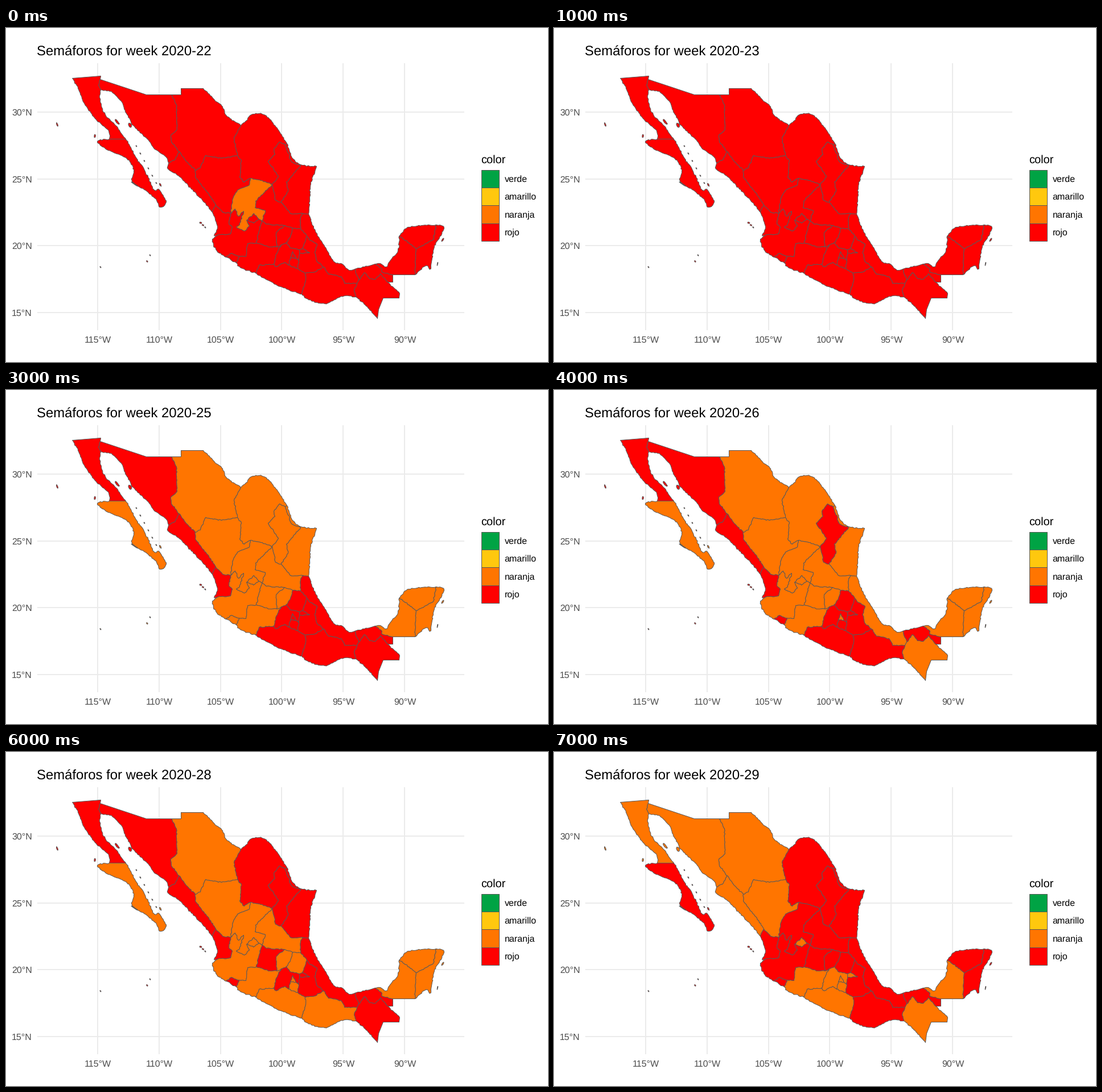
A matplotlib script for the animation above (8000 ms loop, 952x588 px).

```python
import numpy as np
import matplotlib.pyplot as plt
from matplotlib.animation import FuncAnimation
from matplotlib.patches import Polygon, Rectangle

W, H, DPI = 952, 588, 100
PX = 72 / DPI
GREEN, YELLOW, ORANGE, RED = "#00A344", "#FFC80E", "#FF7500", "#FF0000"
EDGE, GRID, AXIS = "#595959", "#EBEBEB", "#4D4D4D"

plt.rcParams["font.family"] = "Liberation Sans"
plt.rcParams["text.hinting"] = "none"
rng = np.random.default_rng(7)
arcs = []      # (states on both sides, points); "~" is sea or abroad
isles = []     # (state, points)


def trace(sides, xy, rough=0, curved=False):
    """Run a line through key points, wrinkling the stretches between them."""
    p = np.array(xy, float).reshape(-1, 2) + .5
    slope = np.gradient(p, axis=0)
    path = [p[:1]]
    for a, b, va, vb in zip(p, p[1:], slope, slope[1:]):
        n = max(1, round(np.hypot(*(b - a)) / 2.8)) if rough else 1
        t = np.linspace(0, 1, n + 1)[1:, None]
        seg = a + (b - a) * t
        if curved:
            ease = t * t * (3 - 2 * t)
            seg = a + (b - a) * ease + t * (1 - t) * (va * (1 - t) - vb * t)
        seg[:-1] += rng.uniform(-rough, rough, (n - 1, 2))
        path.append(seg)
    arcs.append((sides.split(), np.vstack(path)))


def border(sides, *xy):
    trace(sides, xy, rough=.9)


def coast(state, *xy):
    trace(state + " ~", xy, rough=.9, curved=True)


def straight(state, *xy):
    trace(state + " ~", xy)


def isle(state, x, y, rx=.7, ry=1.2, lean=.5):
    t = np.arange(0, 2 * np.pi, .7)
    r = rng.uniform(.8, 1.2, t.size)
    px = x + r * (rx * np.cos(t) + lean * ry * np.sin(t))
    isles.append((state, np.column_stack([px, y + r * ry * np.sin(t)])))


def outline(state):
    """Chain all lines that touch a state into one closed ring."""
    rest = [p for sides, p in arcs if state in sides]
    path = [rest.pop(0)]
    while rest:
        end = path[-1][-1]
        _, i, flip = min((np.hypot(*(p[-f] - end)), i, f)
                         for i, p in enumerate(rest) for f in (0, 1))
        p = rest.pop(i)
        path.append(p[::-1] if flip else p)
    return np.vstack(path)


# Peninsula
coast("BC", 181, 195, 180, 181, 156, 159, 141, 138, 133, 124, 126, 106, 116, 88)
straight("BC", 116, 88, 166, 84, 165, 90)
border("BC SO", 165, 90, 162, 100, 166, 108)
coast("BC", 166, 108, 165, 128, 174, 152, 192, 171, 210, 195)
trace("BC BS", (181, 195, 210, 195))
coast("BS", 181, 195, 160, 199, 177, 214, 200, 223, 217, 235, 224, 252, 221, 270,
      247, 287, 264, 303, 270, 315, 281, 306, 267, 283, 260, 285, 244, 252, 229, 229,
      219, 210, 210, 195)

# North-west
straight("SO", 165, 90, 246, 117, 290, 117)
coast("SO", 166, 108, 182, 111, 192, 118, 205, 134, 211, 150, 227, 176, 249, 196,
      259, 211, 280, 226, 285, 237)
border("SO SI", 285, 237, 297, 230, 303, 217)
border("SO CH", 290, 117, 299, 135, 300, 178, 289, 188, 290, 200, 303, 217)
straight("CH", 290, 117, 307, 117, 307, 106, 346, 106)
coast("CH", 346, 106, 364, 124, 380, 138, 387, 154, 412, 171)
border("CH SI", 303, 217, 318, 236, 332, 250)
border("CH DG", 332, 250, 341, 246, 350, 224, 378, 229, 406, 224)
border("CH CO", 412, 171, 400, 194, 406, 224)
coast("SI", 285, 237, 284, 248, 303, 260, 325, 283, 347, 306, 362, 324)
border("SI DG", 332, 250, 332, 262, 352, 288, 368, 311)
border("SI NY", 362, 324, 368, 311)

# North-east
coast("CO", 412, 171, 421, 163, 434, 151, 455, 153, 474, 174, 493, 203)
border("CO TM", 493, 203, 490, 205)
border("CO NL", 490, 205, 480, 200, 470, 213, 472, 222, 460, 234, 478, 261, 467, 275)
border("CO DG", 406, 224, 413, 234, 410, 262, 418, 271, 429, 264)
border("CO ZC", 429, 264, 447, 268, 467, 275)
border("NL TM", 490, 205, 501, 235, 517, 242, 492, 271, 495, 287, 483, 306)
border("NL SL", 467, 275, 473, 303, 483, 306)
coast("TM", 493, 203, 504, 230, 522, 241, 545, 243)
coast("TM", 545, 243, 535, 274, 533, 300, 531, 327)
border("TM SL", 483, 306, 499, 326, 521, 326)
border("TM VE", 521, 326, 531, 327)

# Centre-north
border("DG NY", 368, 311, 380, 324, 394, 326)
border("DG ZC", 429, 264, 427, 276, 406, 285, 398, 300, 394, 326)
border("ZC SL", 467, 275, 438, 304, 437, 316, 455, 321, 449, 339)
border("ZC JA", 394, 326, 402, 318, 408, 331, 417, 322, 410, 346, 404, 350, 418, 357,
       427, 348, 422, 338)
border("ZC AG", 422, 338, 435, 326, 444, 336)
border("AG JA", 422, 338, 434, 343, 444, 336)
border("ZC JA", 444, 336, 449, 339)
border("SL VE", 521, 326, 517, 332, 517, 353)
border("SL GT", 449, 339, 457, 345, 489, 347)
border("SL QR", 489, 347, 503, 352)
border("SL HG", 503, 352, 517, 353)

# West
border("NY JA", 394, 326, 391, 344, 397, 350, 394, 362, 371, 364)
coast("NY", 362, 324, 371, 349, 365, 365, 371, 364)
coast("JA", 371, 364, 362, 374, 370, 392, 386, 403)
border("JA CL", 386, 403, 396, 396, 409, 401)
border("JA MI", 409, 401, 421, 402, 424, 379, 439, 378)
border("JA GT", 449, 339, 443, 361, 439, 378)
coast("CL", 386, 403, 404, 413)
border("CL MI", 409, 401, 404, 413)
coast("MI", 404, 413, 412, 422, 438, 431)
border("MI GT", 439, 378, 463, 385, 475, 385)
border("MI QR", 475, 385, 483, 381)
border("MI MX", 483, 381, 474, 398, 470, 415)
border("MI GR", 470, 415, 444, 417, 438, 431)

# Centre
border("GT QR", 489, 347, 474, 360, 475, 385)
border("QR HG", 503, 352, 499, 366, 492, 377)
border("QR MX", 492, 377, 483, 381)
border("HG VE", 517, 353, 528, 366)
border("HG PU", 528, 366, 520, 388)
border("HG TL", 520, 388, 515, 390)
border("HG MX", 515, 390, 498, 386, 492, 377)
border("TL PU", 520, 388, 533, 395, 515, 396)
border("TL MX", 515, 396, 515, 390)
border("PU MX", 515, 396, 514, 409)
border("DF MX", 499, 404, 503, 393, 509, 405)
border("DF MO", 499, 404, 509, 405)
border("MO MX", 499, 404, 496, 417)
border("MO MX", 509, 405, 514, 409)
border("MO PU", 514, 409, 512, 423)
border("MO GR", 496, 417, 512, 423)
border("MX GR", 470, 415, 474, 420, 489, 412, 496, 417)
border("PU GR", 512, 423, 525, 431)
border("PU VE", 528, 366, 533, 373, 546, 380, 542, 396, 545, 409, 557, 420)
border("PU OX", 557, 420, 542, 429, 525, 431)

# South and Gulf
coast("GR", 438, 431, 456, 442, 487, 457, 519, 468)
border("GR OX", 525, 431, 526, 444, 519, 468)
coast("OX", 519, 468, 530, 477, 560, 485, 588, 472, 614, 473)
border("VE OX", 557, 420, 566, 433, 588, 437, 594, 449, 616, 449)
border("OX CS", 616, 449, 611, 463, 614, 473)
border("VE CS", 616, 449, 619, 443)
border("VE TB", 619, 443, 612, 424)
coast("VE", 531, 327, 543, 357, 562, 388, 576, 411, 590, 415, 602, 426, 612, 424)
coast("TB", 612, 424, 648, 415)
border("TB CS", 619, 443, 629, 430, 638, 441, 648, 442, 657, 432, 670, 447)
border("TB CP", 648, 415, 658, 422, 661, 430, 679, 434)
straight("TB", 679, 434, 679, 447, 670, 447)
coast("CS", 614, 473, 632, 489, 652, 511)
straight("CS", 652, 511, 654, 495, 662, 475, 690, 475, 691, 467)
coast("CS", 691, 467, 670, 447)

# Yucatan peninsula
coast("CP", 648, 415, 657, 414, 667, 420, 673, 411, 688, 391, 690, 366)
border("CP YU", 690, 366, 708, 378, 720, 388)
border("CP QN", 720, 388, 718, 434)
straight("CP", 679, 434, 718, 434)
coast("YU", 690, 366, 703, 352, 730, 347, 755, 346)
border("YU QN", 720, 388, 750, 372, 755, 346)
coast("QN", 755, 346, 769, 351, 752, 385, 748, 405, 745, 424, 737, 418, 718, 434)

# Islands
isle("BC", 90, 170, 1, 3, .3)
isle("BC", 156, 190, 1.3, 3, -.1)
isle("BC", 195, 165, 2, 5, .7)
isle("SO", 218, 171, 3, 4, .2)
isle("BS", 226, 275, 1, 4, 1.4)
isle("BS", 271, 276, 1.2, 2.5)
isle("QN", 767, 373, 1.2, 3, -.6)
isle("QN", 758, 415, .5, 3, -.2)
isle("CL", 248, 411, 1.2, 1.2)
isle("CL", 253, 400)
isle("CL", 166, 421)
for k in range(6):
    isle("BS", 229 + 7 * k, 208 + 13 * k)
for k in range(3):
    isle("NY", 342 + 4 * k, 343 + 4 * k, 2 - .6 * k)

# States in red for each week; the others are orange
ALL = sorted({s for sides, _ in arcs for s in sides} - {"~"})
NORTH = "BC SO SI NY "
W24 = NORTH + "CL QR HG MX DF MO TL PU VE GR OX CS"
W25 = NORTH + "TB HG MX DF MO TL PU VE GR OX CS"
W26 = NORTH + "NL CL GR OX TB HG MX MO PU TL"
W27 = NORTH + "CL CO NL TM GT MX PU TL VE TB CS"
W29 = "NY JA CL GT QR HG PU VE TB OX YU QN TM NL CO SL ZC BS"
reds = [[s for s in ALL if s != "ZC"], ALL]
reds += [week.split() for week in (W24, W25, W26, W27, W27, W29)]

fig = plt.figure(figsize=(W / DPI, H / DPI), dpi=DPI, facecolor="white")
ax = fig.add_axes([0, 0, 1, 1])
ax.set(xlim=(0, W), ylim=(H, 0))
ax.axis("off")


def label(x, y, s, size, color="black", ha="left"):
    return ax.text(x, y, s, fontsize=size * PX, color=color, ha=ha, va="baseline")


def gridline(x, y):
    ax.plot(x, y, color=GRID, lw=2 * PX, solid_capstyle="butt", zorder=0)


for i in range(6):
    x = 161 + 107.8 * i
    gridline([x, x], [62, 532])
    label(x + .5, 554, f"{115 - 5 * i}°W", 16, AXIS, "center")
for i in range(4):
    y = 148 + 117.55 * i
    gridline([55, 805], [y, y])
    label(46, y + 6, f"{30 - 5 * i}°N", 16, AXIS, "right")

label(834.5, 238, "color", 20)
legend = zip(("verde", "amarillo", "naranja", "rojo"), (GREEN, YELLOW, ORANGE, RED))
for i, (name, color) in enumerate(legend):
    y = 250 + 31.2 * i
    ax.add_patch(Rectangle((835, y), 30.6, 31.2, fc=color, ec=EDGE, lw=PX))
    label(875.5, y + 21, name, 16)

shapes = {s: [] for s in ALL}
for s, pts in [(s, outline(s)) for s in ALL] + isles:
    patch = Polygon(pts, closed=True, ec=EDGE, lw=PX, joinstyle="round", zorder=2)
    shapes[s].append(ax.add_patch(patch))
title = label(54.5, 48, "", 23.9)


def draw(i):
    title.set_text(f"Semáforos for week 2020-{22 + i}")
    for s, patches in shapes.items():
        for p in patches:
            p.set_facecolor(RED if s in reds[i] else ORANGE)
    return [title]


anim = FuncAnimation(fig, draw, frames=8, interval=1000, repeat=True, repeat_delay=0)
plt.show()
```
